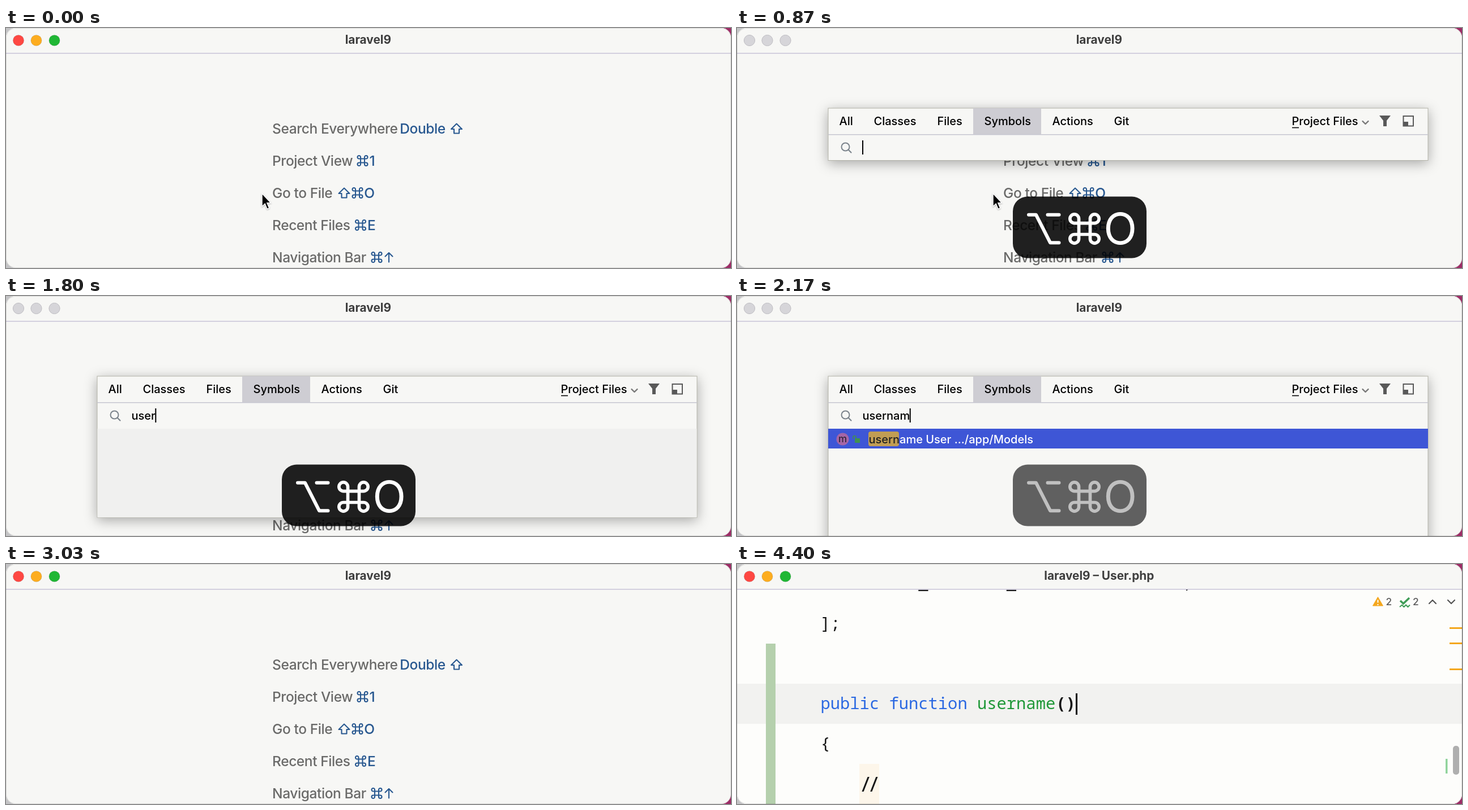
An HTML page for the animation above (4.43 s loop, 1280 by 425 pixels).

```html
<!DOCTYPE html>
<html lang="en">
<head>
<meta charset="utf-8">
<title>Go to symbol</title>
<style>
  html, body { margin: 0; width: 100%; height: 100%; overflow: hidden; }
  svg { display: block; width: 1280px; height: 425px; font-family: Inter, "Open Sans", sans-serif; }
  text { white-space: pre; }
  .line { fill: none; stroke-linecap: round; stroke-linejoin: round; }
  .title { font-size: 20.8px; font-weight: 700; fill: #3e3e3e; text-anchor: middle; }
  #hints { font-size: 24.5px; font-weight: 450; letter-spacing: -.4px; fill: #6a6a69; }
  #hints .key { fill: #285890; }
  #hints use { fill: none; stroke: #285890; stroke-width: 2.1; stroke-linejoin: round; stroke-linecap: round; }
  #popup { font-size: 20px; font-weight: 450; filter: drop-shadow(0 5px 11px rgba(0, 0, 0, .32)); }
  #code { font: 500 28.8px "Noto Sans Mono", "DejaVu Sans Mono", monospace; fill: #161616; }
  #status { font-size: 17.4px; font-weight: 450; fill: #5a5a5a; }
</style>
</head>
<body>
<svg viewBox="0 0 1280 425">
  <defs>
    <path id="cmd" d="M6.5 3.75V16.25A2.75 2.75 0 1 1 3.75 13.5H16.25A2.75 2.75 0 1 1 13.5 16.25V3.75A2.75 2.75 0 1 1 16.25 6.5H3.75A2.75 2.75 0 1 1 6.5 3.75Z"/>
    <path id="shift" d="M11 1.5L20.5 11H15.5V18.5H6.5V11H1.5Z"/>
    <path id="up" d="M8 18.5V2M1.5 8.5L8 2L14.5 8.5"/>
    <linearGradient id="desk">
      <stop offset=".4" stop-color="#c4c4c6"/><stop offset=".6" stop-color="#9c2c66"/>
    </linearGradient>
    <clipPath id="window"><rect width="1280" height="425" rx="17"/></clipPath>
    <clipPath id="body"><rect y="45" width="1280" height="380"/></clipPath>
  </defs>

  <rect width="1280" height="425" fill="url(#desk)"/>
  <g clip-path="url(#window)">
    <rect width="1280" height="425" fill="#f7f7f5"/>

    <g id="hints">
      <text x="470" y="186.5">Search Everywhere</text>
      <text x="695.3" y="186.5" class="key">Double</text>
      <use href="#shift" x="784.5" y="168"/>
      <text x="470" y="243.5">Project View</text>
      <use href="#cmd" x="619.5" y="225"/>
      <text x="641.5" y="243.5" class="key">1</text>
      <text x="470" y="300.5">Go to File</text>
      <use href="#shift" x="586" y="282"/>
      <use href="#cmd" x="610.5" y="282"/>
      <text x="632.3" y="300.5" class="key">O</text>
      <text x="470" y="357.5">Recent Files</text>
      <use href="#cmd" x="616" y="339"/>
      <text x="638" y="357.5" class="key">E</text>
      <text x="470" y="414.5">Navigation Bar</text>
      <use href="#cmd" x="644.5" y="396"/>
      <use href="#up" x="668" y="396"/>
    </g>

    <g id="editor">
      <rect y="45" width="1280" height="380" fill="#fdfdfb"/>
      <rect y="212" width="1280" height="71" fill="#f2f2f0"/>
      <rect x="51" y="141" width="17" height="284" fill="#b5d0ad"/>
      <rect x="216" y="354" width="35" height="71" fill="#fdf6ea"/>
      <g id="code" clip-path="url(#body)">
        <text x="147.5" y="43">    'email_verified_at' => 'datetime',</text>
        <text x="147.5" y="114.5">];</text>
        <text x="147.5" y="257"><tspan fill="#2b69e2">public function</tspan><tspan fill="#1f9838"> username</tspan><tspan font-weight="700" dx="1">()</tspan></text>
        <text x="147.5" y="328">{</text>
        <text x="216" y="403" font-size="37" font-weight="400" letter-spacing="-7.5" style="font-variant-ligatures:none">//</text>
      </g>
      <rect id="codeCaret" x="598" y="229" width="3" height="38"/>
      <rect x="1251" y="345" width="3.5" height="26" fill="#90d39b"/>
      <rect id="thumb" x="1264" y="322" width="11" height="51" rx="5"/>
      <g id="status">
        <text id="busy" x="1169.5" y="73">Analyzing...</text>
        <g id="done">
          <path d="M1131.5 58.5L1140.5 74H1122.5Z" fill="#f4a71d" stroke="#f4a71d" stroke-linejoin="round"/>
          <path d="M1131.5 63.5V68.5M1131.5 71V73" stroke="#fff" stroke-width="2"/>
          <text x="1145.5" y="73">2</text>
          <path d="M1171 65L1176.5 70L1187 60" fill="none" stroke="#3f9d57" stroke-width="3.5"/>
          <path d="M1170 76L1174 72.5L1177.5 76L1181 72.5L1184.5 76L1188 72.5" fill="none" stroke="#3f9d57" stroke-width="2"/>
          <text x="1193" y="73">2</text>
          <path class="line" d="M1222 70L1228 64L1234 70M1255 64L1261 70L1267 64" stroke="#555" stroke-width="2.2"/>
          <path d="M1258 113.5H1280M1258 140.5H1280M1258 186.5H1280" stroke="#f4a71d" stroke-width="3"/>
        </g>
      </g>
    </g>

    <rect width="1280" height="44" fill="#f7f7f5"/>
    <path d="M0 44.7H1280" stroke="#c8c3d8" stroke-width="1.4"/>
    <g id="lights">
      <circle cx="22" cy="22" r="9.6"/><circle cx="53.5" cy="22" r="9.6"/><circle cx="85.5" cy="22" r="9.6"/>
    </g>
    <text id="title" class="title" x="639.3" y="28"></text>

    <g id="popup">
      <rect id="panel" x="161" y="142" width="1059" fill="#f7f7f5" stroke="#b3b3a8"/>
      <rect x="417" y="142" width="120" height="46" fill="#cecdd3"/>
      <path d="M161 188.7H1220" stroke="#c6c6d0" stroke-width="1.4"/>
      <g id="tabs"></g>
      <text x="979.5" y="172">Project Files</text>
      <path d="M980 176.5H992" stroke="#000" stroke-width="1.6"/>
      <path class="line" d="M1104.5 165L1109.5 170L1114.5 165" stroke="#777" stroke-width="2.4"/>
      <path d="M1134 155H1154L1147 164V174H1141V164Z" fill="#595959"/>
      <rect x="1176.5" y="156" width="17.5" height="17.5" fill="none" stroke="#595959" stroke-width="2"/>
      <rect x="1176" y="166" width="9" height="8" fill="#595959"/>
      <path class="line" d="M196.5 215.5L201.5 220.5" stroke="#7c848c" stroke-width="2.2"/>
      <circle cx="191.5" cy="210.5" r="7" fill="none" stroke="#7c848c" stroke-width="2"/>
      <text id="query" x="221.5" y="219"></text>
      <rect id="queryCaret" y="199" width="2" height="25"/>
      <rect id="waiting" x="161.5" y="235" width="1058" height="157" fill="#f0f0ef"/>
      <g id="result">
        <rect x="161" y="235" width="1059" height="35" fill="#3e56d6"/>
        <circle cx="186.5" cy="253.5" r="11" fill="#a565a6"/>
        <text x="186.5" y="259" font-size="17" text-anchor="middle" fill="#33263a">m</text>
        <rect x="208" y="252" width="9" height="8" fill="#42924f"/>
        <path d="M205 253V250Q205 247.5 207.5 247.5T210 250V252" fill="none" stroke="#42924f" stroke-width="1.6"/>
        <rect x="232" y="240" width="54" height="26" rx="4" fill="#c19d53"/>
        <text x="232.5" y="261" fill="#fff"><tspan fill="#222">usern</tspan>ame User .../app/Models</text>
      </g>
    </g>

    <path id="mouse" d="M452 293V316L457.2 311.3L461 320.5L464.7 319L460.8 309.8H467.5Z" stroke="#fff" stroke-width="1.4" style="filter:drop-shadow(0 1px 1px rgba(0,0,0,.3))"/>

    <g id="hud">
      <rect id="hudBox" x="487" y="298.5" width="236" height="109" rx="26" fill="#000"/>
      <g id="hudKeys" fill="#fff" stroke="#fff">
        <path class="line" d="M515 330.8H528L553 380.2H568.5M548.5 330.8H568.5" stroke-width="6"/>
        <use href="#cmd" transform="translate(585 327) scale(2.85)" fill="none" stroke-width="2"/>
        <text x="676.7" y="383" font-size="77" text-anchor="middle" stroke="none">O</text>
      </g>
    </g>
    <rect x=".5" y=".5" width="1279" height="424" rx="16.5" fill="none" stroke="#000" stroke-opacity=".13"/>
  </g>
</svg>
<script>
const LOOP = 4430, OPEN = 500, TYPE = 1400, KEY_GAP = 118, FOUND = 1930, ENTER = 3030, EDITOR = 3300, ANALYZED = 3900;
const $ = id => document.getElementById(id);
const show = (id, on) => $(id).style.display = on ? '' : 'none';
const between = (t, a, b) => t >= a && t < b;
const clamp = (v, lo, hi) => Math.min(hi, Math.max(lo, v));

const tabs = { All: 180.5, Classes: 241.5, Files: 353.5, Symbols: 436.5, Actions: 556.5, Git: 665.5 };
$('tabs').innerHTML = Object.entries(tabs).map(([name, x]) => `<text x="${x}" y="172">${name}</text>`).join('');

const lights = [...$('lights').children];
const lit = ['#fe4843', '#fdad20', '#20b735'];

function draw(t) {
  const popup = between(t, OPEN, ENTER), editor = t >= EDITOR;
  lights.forEach((dot, i) => {
    dot.setAttribute('fill', popup ? '#d6d5d9' : lit[i]);
    dot.setAttribute('stroke', popup ? '#bdbcc1' : 'rgba(0,0,0,.12)');
  });
  $('title').textContent = editor ? 'laravel9 – User.php' : 'laravel9';
  show('hints', !editor);
  show('mouse', t < TYPE);

  show('popup', popup);
  $('query').textContent = 'username'.slice(0, clamp(Math.floor((t - TYPE) / KEY_GAP) + 1, 0, 8));
  if (popup) $('queryCaret').setAttribute('x', 221 + $('query').getComputedTextLength());
  show('queryCaret', t < 1000 || between(t, TYPE, 2730));
  show('waiting', between(t, TYPE, FOUND));
  show('result', t >= FOUND);
  $('panel').setAttribute('height', t < TYPE ? 92.5 : t < FOUND ? 250 : 400);

  const fade = t < 430 ? 0 : clamp((2520 - t) / 500, 0, 1);
  show('hud', fade > 0);
  $('hudBox').setAttribute('opacity', .87 * fade);
  $('hudKeys').setAttribute('opacity', fade ** 1.4);

  show('editor', editor);
  show('codeCaret', !between(t, 3800, 4300));
  show('busy', t < ANALYZED);
  show('done', t >= ANALYZED);
  const gray = 95 + 80 * clamp((t - 4100) / 300, 0, 1);
  $('thumb').setAttribute('fill', `rgb(${gray},${gray},${gray})`);
}

const start = performance.now();
function tick() {
  draw((performance.now() - start) % LOOP);
  requestAnimationFrame(tick);
}
tick();
</script>
</body>
</html>
```
